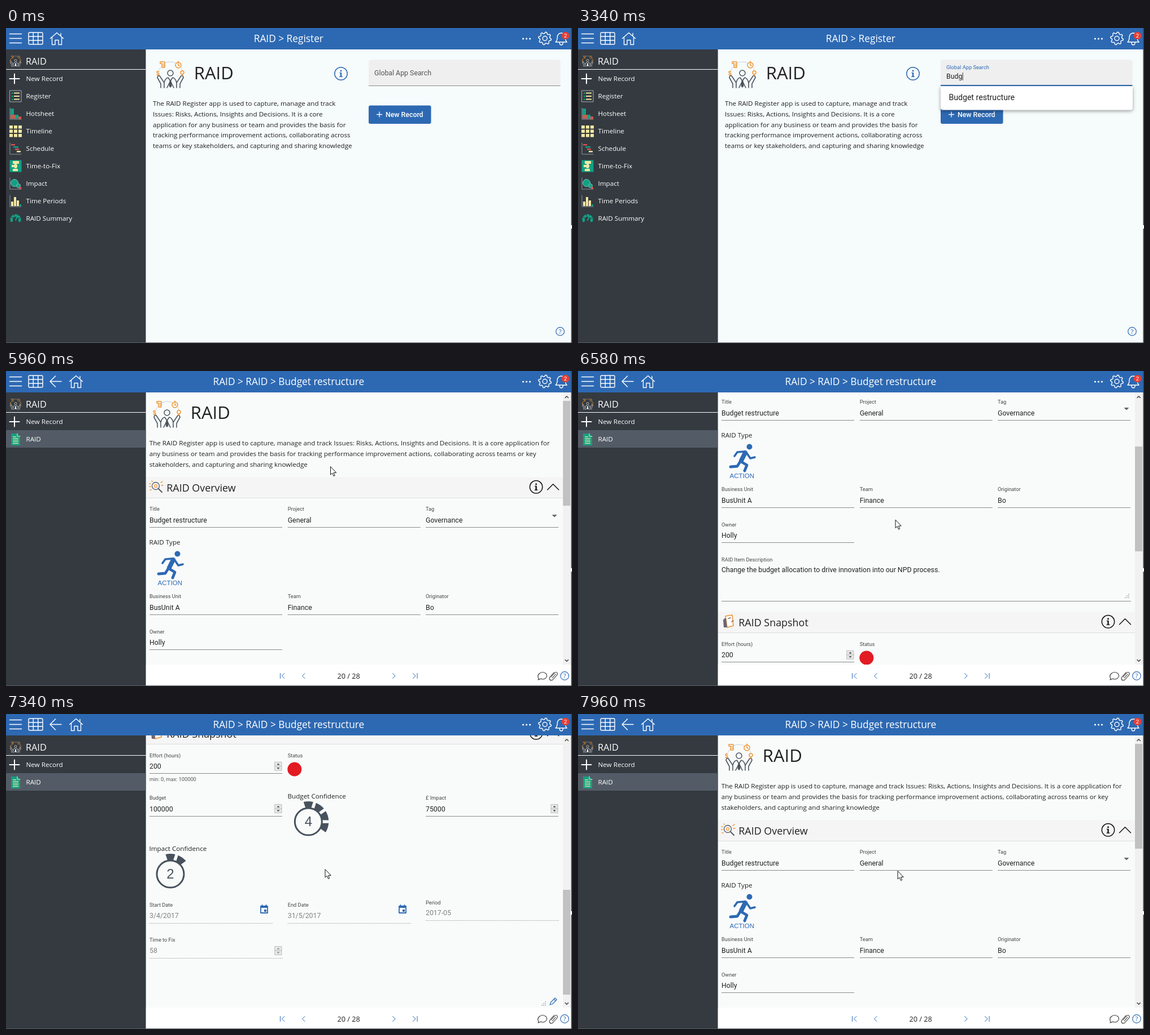
These frames come from a looping animation (1002x559 px, 8000 ms). An HTML page with a canvas:

```html
<!DOCTYPE html>
<html lang="en">
<head>
<meta charset="utf-8">
<title>RAID Register</title>
<style>
html, body { margin: 0; width: 100%; height: 100%; overflow: hidden; }
canvas { display: block; }
</style>
</head>
<body>
<canvas id="stage" width="1002" height="559"></canvas>
<script>
const ctx = document.getElementById('stage').getContext('2d');
const LOOP = 8000;
const UI = '"Open Sans", "Noto Sans", sans-serif', FORM = 'Roboto, sans-serif', ARIAL = '"Liberation Sans", sans-serif';
const BLUE = '#2d69b3', DARK = '#343a40', INK = '#212121', SLATE = '#47525d';
const TEAL = '#12a085', CREAM = '#f6e8a4', RED = '#d9534f', ORANGE = '#f0912d';

// Baselines sit on whole pixels to keep the text crisp.
function text(s, x, y, size = 11.66, color = INK, font = UI, align = 'left', weight = 400) {
  ctx.font = `${weight} ${size}px ${font}`;
  ctx.fillStyle = color;
  ctx.textAlign = align;
  ctx.fillText(s, x, Math.round(y));
}
const form = (s, x, y, color = INK, size = 12.33) => text(s, x, y, size, color, FORM);
function rect(x, y, w, h, color, r = 0) {
  ctx.fillStyle = color;
  ctx.beginPath();
  ctx.roundRect(x, y, w, h, r);
  ctx.fill();
}
function disc(x, y, r, fill, stroke, width = 1.5) {
  ctx.beginPath();
  ctx.arc(x, y, r, 0, Math.PI * 2);
  if (fill) { ctx.fillStyle = fill; ctx.fill(); }
  if (stroke) { ctx.strokeStyle = stroke; ctx.lineWidth = width; ctx.stroke(); }
}
function at(x, y, scale, draw) {
  ctx.save();
  ctx.translate(x, y);
  ctx.scale(scale, scale);
  draw();
  ctx.restore();
}
function path(d, stroke, width = 1.5, fill, x = 0, y = 0) {
  at(x, y, 1, () => {
    const p = new Path2D(d);
    ctx.lineJoin = ctx.lineCap = 'round';
    if (fill) { ctx.fillStyle = fill; ctx.fill(p); }
    if (stroke) { ctx.strokeStyle = stroke; ctx.lineWidth = width; ctx.stroke(p); }
  });
}
function clipped(x, y, w, h, draw) {
  ctx.save();
  ctx.beginPath();
  ctx.rect(x, y, w, h);
  ctx.clip();
  draw();
  ctx.restore();
}
// Linear interpolation over [time, ...values] keys.
function track(keys, t) {
  const i = keys.findIndex(k => k[0] > t);
  if (i < 0) return keys.at(-1).slice(1);
  if (i === 0) return keys[0].slice(1);
  const a = keys[i - 1], b = keys[i], f = (t - a[0]) / (b[0] - a[0]);
  return a.slice(1).map((v, j) => v + (b[j + 1] - v) * f);
}

function appIcon(x, y, scale, line) {
  at(x, y, scale, () => {
    path('M-9 -20Q0 -24 9 -20M-20 -7Q-19 -10 -17 -12M21 -7Q21 -10 19 -12', '#c5d3de', 1);
    disc(0, -2, 5, null, line, 1.5);
    path('M-11 24V15L-19 3M-17 24V17L-23 6Q-22 1 -19 3M11 24V15L19 3M17 24V17L23 6Q22 1 19 3M-11 15Q-9 7 -4 6L0 12L4 6Q9 7 11 15M-6 24L0 12L6 24', line, 1.6);
    path('M-1.5 12H1.5L2.5 21L0 24L-2.5 21Z', null, 0, line);
    path('M-18 -22H-10V-12H-15M-18 -22V-19H-15V-12M-13 -18H-11.5M-13 -15H-11.5', ORANGE, 1.4);
    disc(14, -16, 5, null, ORANGE, 1.4);
    path('M14 -23V-21M14 -19V-16L16 -15', ORANGE, 1.4);
    disc(21, -3, 3, null, ORANGE, 1.4);
    path('M20 2H22', ORANGE, 1.4);
    text('$', -22, 2, 10.5, ORANGE, ARIAL, 'center', 700);
  });
}
function infoMark(x, y, color) {
  disc(x, y, 11.2, null, color, 1.5);
  rect(x - 1.2, y - 2, 2.4, 8, color);
  rect(x - 2.7, y - 2, 3, 1.2, color);
  rect(x - 3, y + 4.8, 6, 1.2, color);
  disc(x, y - 5, 1.5, color);
}
function helpMark(x, y) {
  disc(x, y, 7.3, null, BLUE, 1.2);
  text('?', x, y + 4.2, 11.5, BLUE, UI, 'center');
}

function header(record) {
  rect(0, 0, 1002, 38, BLUE);
  path('M6.5 10.5H27.5M6.5 18.5H27.5M6.5 26.5H27.5', '#fff', 1.5);
  path('M42 8H63Q65 8 65 10V27Q65 29 63 29H42Q40 29 40 27V10Q40 8 42 8ZM40 15H65M40 22H65M48.3 8V29M56.7 8V29', '#fff', 1.4);
  if (record) path('M98 18.5H78M87.5 9L78 18.5L87.5 28', '#fff', 1.5);
  path('M-11.5 0L0 -10L11.5 0M-8.5 -2V11H-3V3H3V11H8.5V-2M7 -9V-5', '#fff', 1.4, null, record ? 124 : 90, 18.5);
  text(record ? 'RAID > RAID > Budget restructure' : 'RAID > Register', 500.3, 25, 17.3, '#fff', UI, 'center');
  for (const x of [915.5, 921.5, 927.5]) disc(x, 19, 1.6, '#fff');
  disc(954, 18.5, 4, null, '#fff', 1.4);
  let gear = '';
  for (let i = 0; i < 32; i++) {
    const a = (i + .5) / 32 * Math.PI * 2, r = i % 4 < 2 ? 11.3 : 8.8;
    gear += `${i ? 'L' : 'M'}${r * Math.cos(a)} ${r * Math.sin(a)}`;
  }
  path(gear + 'Z', '#fff', 1.4, null, 954, 18.5);
  path('M973 25Q976 22 976 16Q977 9 983 9Q990 9 990 16Q990 22 993 25ZM980 26Q980 30 983 30Q986 30 986 26', '#fff', 1.4);
  disc(990.5, 13.5, 6.8, '#e53f35');
  text('2', 990.5, 17, 9.5, '#fff', FORM, 'center');
}

const axis = () => path('M-10 -10V10H10', '#8b959d', 1);
const bars = list => list.forEach(b => rect(...b));
const sideIcons = [
  () => path('M-10.5 0H6.5M-2 -8.5V8.5', '#fff', 2),
  () => {
    path('M-10 -10H10V10H-10Z', '#a9b3b5', 1);
    for (const y of [-5.5, 0, 5.5]) bars([[-7, y - 1, 2.5, 2.5, TEAL], [-3, y - 1, 10, 2, CREAM]]);
  },
  () => { axis(); bars([[-9, -9, 6, 11, TEAL], [-9, 2, 9, 7, '#bd6254'], [0, 2, 5, 7, TEAL], [5, 5, 5, 5, RED]]); },
  () => { for (let i = 0; i < 9; i++) rect(-11 + i % 3 * 8, -10 + (i / 3 | 0) * 7.5, 6, 5.5, CREAM); },
  () => { axis(); bars([[-8, -8, 7, 2.5, RED], [-4, -4, 9, 2.5, TEAL], [-1, 0, 7, 2.5, RED], [2, 4, 7, 2.5, CREAM]]); },
  () => bars([[-10.5, -10.5, 21, 21, TEAL], [-5, -9, 11, 5, CREAM], [-2, -4, 4, 8, CREAM], [-7, -2, 10, 4, CREAM], [-5, 5, 9, 4, CREAM]]),
  () => { axis(); disc(-2, -1, 6.5, TEAL, '#74c3b2', 1); disc(5, 4, 3.5, TEAL, '#74c3b2', 1); disc(8, 8, 2.2, RED); },
  () => { axis(); bars([[-8, 1, 4, 8, CREAM], [-3, -7, 4, 16, CREAM], [2, -1, 4, 10, CREAM], [7, 6, 3, 3, TEAL]]); },
  () => {
    path('M-7 4A7.3 7.3 0 1 1 7 4', TEAL, 4.5);
    path('M-8 -2L-4 -1M-3 -8L-2 -4M4 -7L2 -3M8 -1L4 0', DARK, 1);
    path('M0 3L3 -4', TEAL, 2);
  }
];
const sideNames = ['New Record', 'Register', 'Hotsheet', 'Timeline', 'Schedule', 'Time-to-Fix', 'Impact', 'Time Periods', 'RAID Summary'];

function sidebar(record) {
  rect(0, 38, 247.5, 521, DARK);
  appIcon(17, 58.5, .41, '#fff');
  text('RAID', 35, 65, 16.3, '#fff');
  rect(0, 73, 247.5, 1, '#fff');
  if (record) rect(0, 105, 247.5, 31, '#535c66');
  (record ? ['New Record', 'RAID'] : sideNames).forEach((name, i) => {
    const y = 90 + 31 * i;
    text(name, 35.5, y + 4, 11.66, '#fff');
    if (record && i) {
      path('M9 111H20L25 116V132H9Z', null, 0, TEAL);
      path('M20 111V116H25', CREAM, 1);
      for (let k = 0; k < 5; k++) rect(12, 116 + k * 3, k ? 10 : 6, 1.2, CREAM);
    } else at(17, y, 1, sideIcons[i]);
  });
}

const typedAt = [2230, 2460, 2950, 3340, 3490, 3650];
const FOCUS = 1450, BLUR = 4560, PAGE = 4890;

function searchBox(t) {
  const focused = t >= FOCUS && t < BLUR;
  const lift = Math.min(1, Math.max(0, (t - FOCUS) / 160));
  rect(642, 56.5, 339.5, 45.5, '#efefef', [4, 4, 0, 0]);
  rect(642, focused ? 101 : 102, 339.5, focused ? 2 : 1, focused ? BLUE : '#8a8a8a');
  form('Global App Search', 652, 84 - 11 * lift, focused ? BLUE : '#555', 12.33 - 3.06 * lift);
  const typed = 'Budget'.slice(0, typedAt.filter(k => k <= t).length);
  form(typed, 652, 90);
  if (focused && (t < 1930 || t >= 2230)) rect(652.3 + ctx.measureText(typed).width, 79, 1, 14, '#333');
}
function results(t) {
  const two = t < 3170, h = two ? 83 : 42;
  ctx.save();
  ctx.shadowColor = 'rgba(0,0,0,.38)';
  ctx.shadowBlur = 6;
  ctx.shadowOffsetY = 2;
  rect(642, 103.5, 340, h, t > 4350 ? '#f5f5f5' : '#fff', [0, 0, 4, 4]);
  ctx.restore();
  if (t > BLUR) clipped(642, 103.5, 340, h, () => disc(696, 115, (t - BLUR) * .635, '#dadada'));
  const names = two ? ['Business case', 'Budget restructure'] : ['Budget restructure'];
  names.forEach((s, i) => form(s, 656.4, 128 + 41 * i, INK, 14.14));
}
function home(t, pointer) {
  rect(247.5, 38, 754.5, 521, '#f6fbfc');
  appIcon(291, 82, 1, '#4a545e');
  text('RAID', 332.8, 91, 31);
  infoMark(593, 81, BLUE);
  ['The RAID Register app is used to capture, manage and track',
   'Issues: Risks, Actions, Insights and Decisions. It is a core',
   'application for any business or team and provides the basis for',
   'tracking performance improvement actions, collaborating across',
   'teams or key stakeholders, and capturing and sharing knowledge'
  ].forEach((s, i) => text(s, 260, 138.3 + 18.65 * i));
  const over = t > 150 && t < 990 && pointer[1] > 137 && pointer[1] < 170;
  rect(642, 137.5, 110.5, 32.5, over ? '#3d77bd' : BLUE, 3);
  path('M656.5 153.5H665.5M661 149V158', '#fff', 1.3);
  text('New Record', 672, 158, 12.33, '#fff', FORM, 'left', 500);
  searchBox(t);
  if (t >= 2660) results(t);
  helpMark(981, 538.5);
}

const rule = (x, y, w) => rect(x, Math.round(y), w, 1, '#8a8a8a');
function field(label, value, x, y) {
  form(label, x, y, '#444', 9.25);
  form(value, x, y + 20.3);
  rule(x, y + 28.2, 235);
}
function lockedField(label, value, x, y, w) {
  form(label, x, y, '#444', 9.25);
  form(value, x, y + 19.5, '#808080');
  for (let i = 0; i < w; i += 3) rect(x + i, Math.round(y + 28.4), 1.5, 1, '#999');
}
function spinner(x, y, tone = '#333') {
  rect(x - 6, y - 7.5, 12, 15, '#e6e6e6');
  path('M-6 -7.5H6V7.5H-6ZM-6 0H6', '#aaa', .7, null, x, y);
  path('M-2.5 -2.5H2.5L0 -5ZM-2.5 2.5H2.5L0 5Z', null, 0, tone, x, y);
}
function dial(value, x, y) {
  disc(x, y, 24, null, SLATE, 3);
  ctx.fillStyle = SLATE;
  for (let i = 0; i < value; i++) {
    const a = i * .63 - Math.PI / 2;
    ctx.beginPath();
    ctx.arc(x, y, 36, a - .24, a + .24);
    ctx.arc(x, y, 24, a + .2, a - .2, true);
    ctx.fill();
  }
  text(value, x, y + 8, 24, SLATE, ARIAL, 'center');
}
function section(name, y) {
  rect(248, y, 738, 38, '#f5f5f5');
  rect(248, y + 37, 738, 1, '#dedede');
  text(name, 284.3, y + 26, 17.9);
  infoMark(938.5, y + 17.8, '#111');
  path('M958.5 22.8L968.5 12.8L978.5 22.8', '#111', 1.5, null, 0, y);
}
function grip(x, y) {
  for (let i = 0; i < 6; i++) {
    const c = [0, 1, 2, 1, 2, 2][i], r = [2, 2, 2, 1, 1, 0][i];
    rect(x + c * 3 - 4, y + r * 3 - 4, 1.5, 1.5, '#999');
  }
}
function calendar(x, y) {
  path('M-6 -5H6V7H-6ZM-3.5 -7V-5M3.5 -7V-5', BLUE, 1.8, null, x, y);
  rect(x - 6, y - 5, 12, 3, BLUE);
  rect(x, y + 1, 4, 4, BLUE);
}
function runner() {
  disc(303.5, 324.5, 5, BLUE);
  path('M296 335L289 349', BLUE, 8);
  path('M299 336L305 345L313 343M293 333L282 334L277 341', BLUE, 3.6);
  path('M289 351L299 357L295 367M287 351L282 359L270 360', BLUE, 4.8);
  text('ACTION', 290.3, 380, 11.5, BLUE, ARIAL, 'center');
}
function recordBody() {
  appIcon(285, 76, 1, '#4a545e');
  text('RAID', 326.8, 85, 31);
  ['The RAID Register app is used to capture, manage and track Issues: Risks, Actions, Insights and Decisions. It is a core application for',
   'any business or team and provides the basis for tracking performance improvement actions, collaborating across teams or key',
   'stakeholders, and capturing and sharing knowledge'
  ].forEach((s, i) => text(s, 253.7, 132.3 + 18.65 * i));

  section('RAID Overview', 188);
  disc(265, 204, 6.5, '#f3f7fa', '#59636c', 1.4);
  disc(265, 204, 2.5, null, ORANGE, 1.2);
  path('M270 209L276 215', '#59636c', 2.2);
  path('M254 200H256M254 205H256M255 211H257M274 198L277 196M275 203H278M259 196L258 195', ORANGE, 1.5);

  field('Title', 'Budget restructure', 254, 248.4);
  field('Project', 'General', 498.7, 248.4);
  field('Tag', 'Governance', 743, 248.4);
  path('M966.5 255H975.5L971 259.5Z', null, 0, '#666');
  text('RAID Type', 253.5, 308.4);
  runner();
  field('Business Unit', 'BusUnit A', 254, 403.4);
  field('Team', 'Finance', 498.7, 403.4);
  field('Originator', 'Bo', 743, 403.4);
  field('Owner', 'Holly', 254, 466);
  form('RAID Item Description', 254, 528, '#444', 9.25);
  form('Change the budget allocation to drive innovation into our NPD process.', 254, 547);
  rule(254, 598, 725);
  grip(972, 589.5);

  section('RAID Snapshot', 617);
  path('M261 625L273 623L275 642L264 645Z', ORANGE, 1.6, '#fff');
  path('M257 632Q260 627 262 629L264 645H258Z', null, 0, '#6d6478');
  path('M266 629L270 628M272 635L275 633', '#6d6478', 1.5);

  field('Effort (hours)', '200', 254, 677.8);
  spinner(482, 693.7);
  form('min: 0, max: 100000', 254, 720.4, '#555', 9.25);
  form('Status', 498.7, 677.8, '#444', 9.25);
  disc(510.8, 699, 12.5, '#e31b23');
  field('Budget', '100000', 254, 753.4);
  spinner(482, 769);
  field('£ Impact', '75000', 743, 753.4);
  spinner(971, 769);
  text('Budget Confidence', 498.5, 751.3);
  dial(4, 535.3, 792);
  text('Impact Confidence', 253.5, 844.3);
  dial(2, 291, 885);
  lockedField('Start Date', '3/4/2017', 254, 943.4, 217);
  calendar(457, 947);
  lockedField('End Date', '31/5/2017', 498.7, 943.4, 217);
  calendar(702, 947);
  lockedField('Period', '2017-05', 743, 938.8, 235);
  lockedField('Time to Fix', '58', 254, 1005.4, 235);
  spinner(482, 1021, '#888');
  grip(952, 1115);
  path('M963 1117L964.5 1112.5L972 1105L975 1108L967.5 1115.5ZM970 1107L973 1110', BLUE, 1.2);
}
function record(t) {
  const scroll = Math.round(track([[6300, 0], [6580, 189], [7040, 601], [7345, 601], [7930, 0]], t));
  rect(247.5, 38, 754.5, 521, '#f9fbfb');
  if (t >= 5040) clipped(248, 38, 738, 483, () => { ctx.translate(0, -scroll); recordBody(); });
  rect(986, 38, 14, 483, '#f1f1f1');
  rect(986, Math.round(52.5 + scroll * .431), 13, 186, '#c1c1c1');
  path('M990 47.5L992.7 44.8L995.4 47.5M990 512.5L992.7 515.2L995.4 512.5', '#444', 1.5);
  rect(247.5, 521, 754.5, 38, '#fff');
  path('M485.5 536.5V545.5M493 536.5L488.5 541L493 545.5M529 536.5L524.5 541L529 545.5M684.5 536.5L689 541L684.5 545.5M720.5 536.5L725 541L720.5 545.5M728 536.5V545.5', BLUE, 1);
  text('20 / 28', 606.7, 546, 12.7, INK, UI, 'center');
  path('M943 546Q940 541 944 537Q950 532 956 537Q960 542 954 546Q950 548 947 546L942 548Z', '#333', 1.1);
  path('M965 543L971 536Q974 533 976 536Q977 538 975 540L968 548Q965 550 963 548Q961 546 963 543L970 535M967 545L973 538', '#333', 1.1);
  helpMark(989, 541);
}

const pointerKeys = [
  [150, 604, 520], [400, 617, 360], [760, 690, 109], [990, 690, 109], [1300, 703, 87],
  [2230, 703, 87], [2231, 736, 86], [4050, 736, 86], [4420, 695.5, 113], [5300, 695.5, 113],
  [5900, 574.5, 170], [6040, 574.5, 170], [6400, 562, 264.5], [6600, 562, 264.5],
  [7000, 565, 276], [7340, 565, 276], [7900, 566, 279]
];
function cursor(t, [x, y]) {
  if (t < 150 || t >= 2230 && t < 3650) return;
  if (t > 1200 && t < PAGE && y < 103) {
    path('M-3 -7Q0 -7 0 -5Q0 -7 3 -7M0 -5V5M-3 7Q0 7 0 5Q0 7 3 7', '#222', 1.2, null, x, y);
  } else if (t > 3650 && t < PAGE) {
    path('M-2 9V1.5A1.7 1.7 0 0 1 1.4 1.5V7L7 8.2Q9 8.8 8.8 11L8 15L6.5 20H-1L-6.3 12.3Q-7 10 -5 10L-2 12.5ZM3.5 7.5V11M6 8V11', '#111', 1.1, '#fff', x, y);
  } else {
    path('M0 0V14L3.2 11.2L5.5 16.5L7.7 15.5L5.5 10.4H9.8Z', '#111', 1, '#fff', x, y);
  }
}

function draw(now) {
  const t = now % LOOP, onRecord = t >= PAGE, pointer = track(pointerKeys, t);
  if (onRecord) record(t); else home(t, pointer);
  header(onRecord);
  sidebar(onRecord);
  rect(0, 558, 1002, 1, '#59636b');
  rect(1000.5, 0, 1.5, 559, '#3b4148');
  rect(1000, 350, 2, 6, '#fff');
  cursor(t, pointer);
  requestAnimationFrame(draw);
}
requestAnimationFrame(draw);
</script>
</body>
</html>
```
